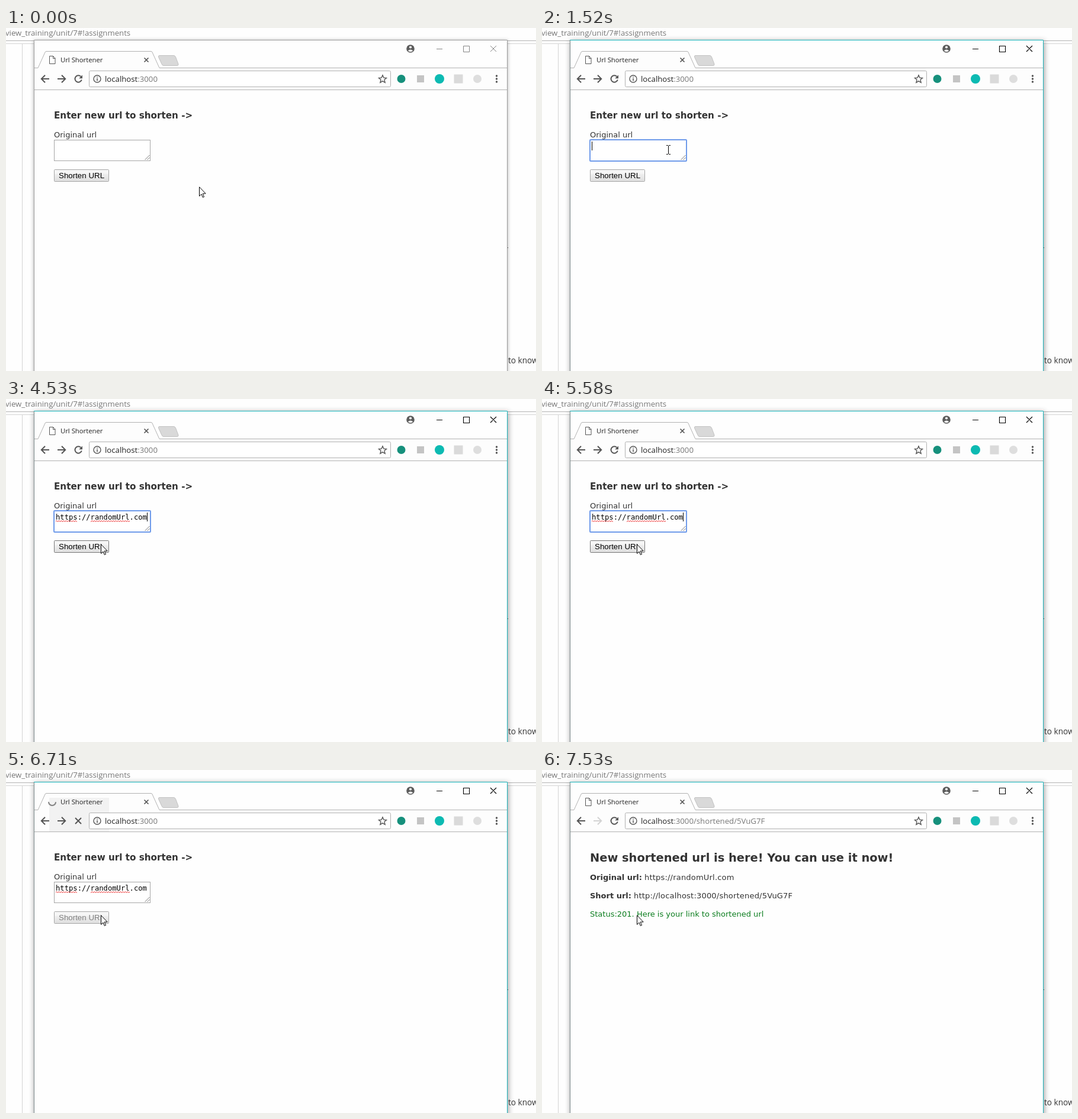
An HTML page for the animation above (8000 ms loop, 895x580 px).

```html
<!DOCTYPE html>
<html lang="en">
<head>
<meta charset="utf-8">
<title>Url Shortener</title>
<style>
  html, body { margin: 0; width: 100%; height: 100%; overflow: hidden; background: #fefefe; }
  svg { display: block; width: 895px; height: 580px; }

  .ui { font-family: "Open Sans", "Noto Sans", sans-serif; }
  .page { font: 13px "DejaVu Sans", sans-serif; fill: #333; }
  .page .wide { letter-spacing: .2px; }
  .b { font-weight: bold; }
  .mono { font: 12.18px "DejaVu Sans Mono", monospace; fill: #000; }
  .btn { font: 13.33px "Liberation Sans", Arial, sans-serif; }
  .line { fill: none; stroke: #b2b2b2; }
  .icon { fill: none; stroke: #555; stroke-width: 2; }
  .shadow { fill: #fefefe; }
  .calm { filter: drop-shadow(0 1px 3px rgba(0,0,0,.32)); }
  .deep { filter: drop-shadow(1px 2px 5px rgba(0,0,0,.42)); }

  /* 8 s loop; 1% = 80 ms; every change is a hard cut */
  [class*="a-"] { animation: 8s step-end infinite; }
  .a-arrow { animation-name: arrow; }
  .a-beam { animation-name: beam; }
  .a-caret1 { animation-name: caret1; }
  .a-caret2 { animation-name: caret2; }
  .a-typed { animation-name: typed; }
  .a-blurred { animation-name: blurred; }
  .a-focused { animation-name: focused; }
  .a-idle { animation-name: idle; }
  .a-active { animation-name: active; }
  .a-hover { animation-name: hover; }
  .a-press { animation-name: press; }
  .a-label { animation-name: label; }
  .a-load { animation-name: load; }
  .a-ready { animation-name: ready; }
  .a-route { animation-name: route; }
  .a-fwd { animation-name: fwd; }
  .a-tint { animation-name: tint; }
  .a-form { animation-name: form; }
  .a-done { animation-name: done; }
  .a-spin { animation-name: spin; }

  @keyframes arrow {
    0% { transform: translate(326px, 268px); visibility: visible; }
    5% { transform: translate(258px, 241px); }
    6.5% { transform: translate(220px, 226px); visibility: visible; }
    12% { transform: translate(220px, 226px); visibility: hidden; }
    36.625% { transform: translate(176px, 236px); visibility: visible; }
    38.5% { transform: translate(162px, 254px); }
    42%, 100% { transform: translate(160px, 245px); visibility: visible; }
  }
  @keyframes beam {
    0% { transform: translate(214px, 205px); visibility: hidden; }
    12% { transform: translate(214px, 205px); visibility: visible; }
    13.875% { transform: translate(210px, 198px); visibility: visible; }
    36.625%, 100% { transform: translate(210px, 198px); visibility: hidden; }
  }
  @keyframes caret1 {
    0%, 25.5%, 100% { visibility: hidden; }
    19% { visibility: visible; }
  }
  @keyframes caret2 {
    0%, 36.625%, 49.625%, 62.375%, 71.75%, 100% { visibility: hidden; }
    29.375%, 43.875%, 56.625%, 69.75% { visibility: visible; }
  }
  @keyframes typed {
    0%, 94.125%, 100% { visibility: hidden; }
    29.375% { visibility: visible; }
  }
  @keyframes focused {
    0%, 71.75%, 100% { visibility: hidden; }
    19% { visibility: visible; }
  }
  @keyframes blurred {
    0%, 71.75% { visibility: visible; }
    19%, 94.125%, 100% { visibility: hidden; }
  }
  @keyframes idle {
    0% { visibility: visible; }
    19%, 100% { visibility: hidden; }
  }
  @keyframes active {
    0% { visibility: hidden; }
    19%, 100% { visibility: visible; }
  }
  @keyframes hover {
    0%, 73.625%, 100% { stroke: #a6a6a6; }
    38.5% { stroke: #777; }
  }
  @keyframes press {
    0%, 73.625%, 100% { visibility: hidden; }
    71.75% { visibility: visible; }
  }
  @keyframes label {
    0% { fill: #000; }
    73.625%, 100% { fill: #808080; }
  }
  @keyframes load {
    0%, 94.125%, 100% { visibility: hidden; }
    73.625% { visibility: visible; }
  }
  @keyframes ready {
    0%, 94.125%, 100% { visibility: visible; }
    73.625% { visibility: hidden; }
  }
  @keyframes route {
    0% { visibility: hidden; }
    89.125%, 100% { visibility: visible; }
  }
  @keyframes fwd {
    0% { stroke: #555; }
    89.125%, 100% { stroke: #d3d3d3; }
  }
  @keyframes tint {
    0%, 94.125%, 100% { visibility: hidden; }
    89.125% { visibility: visible; }
  }
  @keyframes form {
    0% { visibility: visible; }
    94.125%, 100% { visibility: hidden; }
  }
  @keyframes done {
    0% { visibility: hidden; }
    94.125%, 100% { visibility: visible; }
  }
  /* grey arc turns anticlockwise, then a blue one grows clockwise */
  @keyframes spin {
    0%, 73.625% { transform: rotate(-135deg); stroke-dasharray: 45 360; stroke: #808080; }
    75.5% { transform: rotate(-176deg); stroke-dasharray: 86 360; }
    77.0625% { transform: rotate(-210deg); stroke-dasharray: 120 360; }
    78.625% { transform: rotate(-244deg); stroke-dasharray: 154 360; }
    80.5% { transform: rotate(-285deg); stroke-dasharray: 180 360; }
    82.375% { transform: rotate(-326deg); stroke-dasharray: 180 360; }
    83.875% { transform: rotate(-359deg); stroke-dasharray: 180 360; }
    85.75% { transform: rotate(-400deg); stroke-dasharray: 180 360; }
    87.625% { transform: rotate(-440deg); stroke-dasharray: 180 360; stroke: #808080; }
    89.125% { transform: rotate(-88deg); stroke-dasharray: 190 360; stroke: #8496c0; }
    90.625% { transform: rotate(-88deg); stroke-dasharray: 205 360; stroke: #7f98d0; }
    92.125%, 100% { transform: rotate(-88deg); stroke-dasharray: 225 360; stroke: #7b98da; }
  }
</style>
</head>
<body>
<svg viewBox="0 0 895 580" xmlns="http://www.w3.org/2000/svg">
  <defs>
    <linearGradient id="face" x2="0" y2="1">
      <stop offset=".3" stop-color="#f6f6f6"/>
      <stop offset=".4" stop-color="#eee"/>
      <stop offset="1" stop-color="#dedede"/>
    </linearGradient>
    <pattern id="wave" width="4" height="3" y="205" x="84" patternUnits="userSpaceOnUse">
      <path d="M0 2.2L1 .8H1.6L3 2.2H4" fill="none" stroke="#e33"/>
    </pattern>
  </defs>

  <!-- page behind -->
  <rect width="895" height="580" fill="#fefefe"/>
  <text class="ui" x="-1" y="13" font-size="13.2" fill="#777">view_training/unit/7#!assignments</text>
  <path class="line" d="M0 21.5H895"/>
  <path class="line" d="M0 26.5H895M27.5 27V580" style="stroke:#d4d4d4"/>
  <text class="ui" x="848" y="567" font-size="13.6" fill="#333">to know</text>

  <!-- window -->
  <rect class="shadow calm a-idle" x="47" y="20" width="800" height="600"/>
  <rect class="shadow deep a-active" x="47" y="20" width="800" height="600"/>
  <path d="M846 371.5H848" stroke="#444"/>
  <path class="a-idle" d="M47.5 580V20.5H846.5V580" fill="none" stroke="#9c9c9c"/>
  <g class="a-active" fill="none">
    <path d="M47.5 580V20.5" stroke="#7c8a8b"/>
    <path d="M47 20.5H846.5V580" stroke="#19b5bb"/>
  </g>

  <!-- tab strip and toolbar -->
  <path d="M48 67.5H54L66 41Q66.600 39.500 68 39.500H245Q246.500 39.500 247 41L259 67.500H846V104H48Z" fill="#fdfdfd"/>
  <path class="a-load" d="M73 47H174V104H73Z" fill="#f2f2f2"/>
  <path class="a-tint" d="M72 46H249L259 68H377V93H72Z" fill="#f2f2f2"/>
  <path class="line" d="M48 67.500H54L66 41Q66.600 39.500 68 39.500H245Q246.500 39.500 247 41L259 67.500H846M48 104.500H846"/>
  <path d="M259 46.500H283Q285.500 46.500 286.500 49L291 61Q291.500 63.500 289 63.500H266Q264 63.500 263 61L257.500 49Q257 46.500 259 46.500Z" fill="#d9d9d9" stroke="#c2c2c2"/>

  <path class="a-ready" d="M73.500 47.500H79.500L83 51V60.500H73.500ZM79.500 47.500V51.500H83" fill="#fff" stroke="#555"/>
  <g class="a-load" transform="translate(78 54)">
    <circle class="a-spin" r="6" pathLength="360" fill="none" stroke-width="2"/>
  </g>
  <text class="ui" x="92" y="58" font-size="11.3" fill="#222">Url Shortener</text>
  <path class="icon" d="M233.500 50.500L240.500 57.500M240.500 50.500L233.500 57.500" style="stroke-width:1.700"/>

  <circle cx="683" cy="35" r="6.800" fill="#5c5c5c"/>
  <circle cx="683" cy="32.500" r="2.100" fill="#fff"/>
  <path d="M678.800 38.500Q683 34.300 687.200 38.500Q683 42 678.800 38.500Z" fill="#fff"/>
  <g fill="none">
    <path class="a-idle" d="M727 35.500H737M772.500 30.500H782.500V40.500H772.500ZM818 30L828 40M828 30L818 40" stroke="#858585"/>
    <path class="a-active" d="M727 35.500H737M772.500 30.500H782.500V40.500H772.500ZM818 30L828 40M828 30L818 40" stroke="#000" stroke-width="1.100"/>
  </g>

  <path class="icon" d="M73 86H60.500M66 79.800L59.800 86L66 92.200"/>
  <path class="icon a-fwd" d="M87 86H99.500M94 79.800L100.200 86L94 92.200"/>
  <g class="a-ready">
    <path class="icon" d="M126.300 82A5.700 5.700 0 1 0 127.700 87.500"/>
    <path d="M129 79.500V85.300H123.200Z" fill="#555"/>
  </g>
  <path class="icon a-load" d="M117 81L127 91M127 81L117 91"/>

  <rect x="140.500" y="72.500" width="509" height="27" rx="2" fill="#fff" stroke="#b0b0b0"/>
  <circle class="icon" cx="154" cy="86" r="6" style="stroke-width:1.400"/>
  <path d="M154 85V89.500M154 82.200V83.800" stroke="#555" stroke-width="1.500"/>
  <text class="ui" x="167" y="91" font-size="13.2" fill="#222">localhost<tspan fill="#777">:3000<tspan class="a-route">/shortened/5VuG7F</tspan></tspan></text>
  <path class="icon" d="M636 79.800L637.900 84.100L642.500 84.500L639 87.600L640.100 92.200L636 89.800L631.900 92.200L633 87.600L629.500 84.500L634.100 84.100Z" style="stroke-width:1.400"/>

  <circle cx="667.500" cy="86" r="7" fill="#16907c"/>
  <rect x="694" y="80" width="12" height="12" fill="#c4c4c4"/>
  <circle cx="732" cy="86" r="8" fill="#0cbab2"/>
  <rect x="756.500" y="78.500" width="15" height="15" fill="#dadada"/>
  <circle cx="796" cy="86" r="7" fill="#dedede"/>
  <g fill="#555">
    <circle cx="828.500" cy="81" r="1.700"/>
    <circle cx="828.500" cy="86" r="1.700"/>
    <circle cx="828.500" cy="91" r="1.700"/>
  </g>

  <!-- form -->
  <g class="page a-form">
    <text class="b" x="81" y="153" font-size="15.2">Enter new url to shorten -&gt;</text>
    <text x="81" y="185">Original url</text>
    <rect class="a-blurred" x="81.500" y="189.500" width="162" height="35" fill="#fff" stroke="#a6a6a6"/>
    <rect class="a-focused" x="81" y="189" width="163" height="36" rx="1" fill="#fff" stroke="#6f9bea" stroke-width="2"/>
    <path d="M234.500 223L242.500 215M238.500 223L242.500 219" stroke="#777"/>
    <g class="a-typed">
      <path d="M84 205H120V208H84ZM143 205H209V208H143Z" fill="url(#wave)"/>
      <text class="mono" x="84" y="204">https://randomUrl.com</text>
    </g>
    <path class="a-caret1" d="M84.500 192V207" stroke="#000"/>
    <path class="a-caret2" d="M238.500 192V207" stroke="#000"/>
    <rect class="a-hover" x="81.500" y="239.500" width="92" height="20" rx="1" fill="url(#face)"/>
    <rect class="a-press" x="82" y="240" width="91" height="19" fill="#e3e3e3"/>
    <text class="btn a-label" x="89" y="254">Shorten URL</text>
  </g>

  <!-- result -->
  <g class="page a-done">
    <text class="b" x="81" y="155" font-size="19.4">New shortened url is here! You can use it now!</text>
    <text class="b" x="81" y="186">Original url:</text>
    <text class="wide" x="173" y="186">https://randomUrl.com</text>
    <text class="b" x="81" y="217">Short url:</text>
    <text class="wide" x="155" y="217">http://localhost:3000/shortened/5VuG7F</text>
    <text x="81" y="248" fill="#0b7d1e">Status:201. Here is your link to shortened url</text>
  </g>

  <!-- pointers -->
  <path class="a-beam" d="M0 .5H2.500L3.500 1.500L4.500 .5H7M3.500 1V15M0 15.500H2.500L3.500 14.500L4.500 15.500H7" fill="none" stroke="#000"/>
  <path class="a-arrow" d="M.5 .8V16.300L4 12.900L6.300 18.400L8.500 17.500L6.200 12H11.200Z" fill="#fff" stroke="#000"/>
</svg>
</body>
</html>
```
